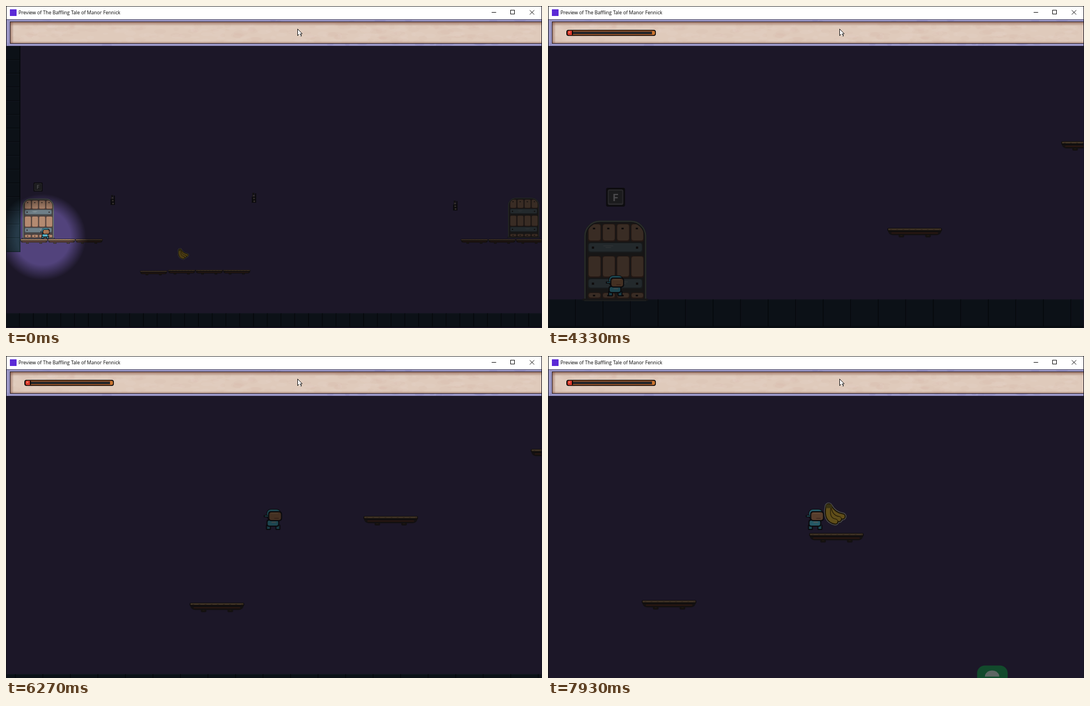
Recreate the animation shown at these times as an HTML page with a canvas. Size 964 by 581 pixels, loop 8 s.

```html
<!DOCTYPE html>
<html lang="en">
<head>
<meta charset="utf-8">
<title>Game preview</title>
<style>
  html, body { margin: 0; width: 100%; height: 100%; overflow: hidden; background: #1c1728; }
  canvas { display: block; width: 964px; height: 581px; }
</style>
</head>
<body>
<canvas id="stage" width="964" height="581"></canvas>
<script>
const W = 964, H = 581, LOOP = 8000, STEP = 200 / 3, DIM = 0.29;
const main = document.getElementById('stage').getContext('2d');
let g = main;

const layer = () => {
  const c = document.createElement('canvas');
  c.width = W;
  c.height = H;
  return c.getContext('2d');
};
const clamp = (v, lo, hi) => Math.max(lo, Math.min(hi, v));
const rgb = (r, gr, b, k = 1) => `rgb(${r * k | 0},${gr * k | 0},${b * k | 0})`;
const rect = (x, y, w, h, fill) => { g.fillStyle = fill; g.fillRect(x, y, w, h); };
const round = (x, y, w, h, r, fill) => {
  g.beginPath();
  g.roundRect(x, y, w, h, r);
  g.fillStyle = fill;
  g.fill();
};
const at = (x, y, s, draw) => {
  g.save();
  g.translate(x, y);
  g.scale(s, s);
  draw();
  g.restore();
};
const line = (color, width, ...pts) => {
  g.beginPath();
  pts.forEach(([x, y]) => g.lineTo(x, y));
  g.strokeStyle = color;
  g.lineWidth = width;
  g.stroke();
};

// ---- sprites, sized for the close-up room ----

// The door opens and shuts in four steps of 200 ms each way
const swing = (t, start) => {
  const n = Math.floor((t - start) / 200) + 1;
  return 1 - 0.24 * Math.max(0, 4 - Math.abs(n - 4));
};

function door(x, y, s, k, open) {
  at(x, y, s, () => {
    const arch = d => {
      g.beginPath();
      g.roundRect(d, d, 112 - 2 * d, 144 - d, [28 - d, 28 - d, 0, 0]);
    };
    arch(0);
    g.fillStyle = rgb(70, 68, 70, k);
    g.fill();
    arch(1.5);
    g.strokeStyle = rgb(142, 158, 146, k);
    g.lineWidth = 2.4;
    g.stroke();
    arch(4.5);
    g.fillStyle = open < 1 ? rgb(98, 95, 100, k) : rgb(82, 76, 76, k);
    g.fill();
    g.save();
    g.clip();
    // Planks and bands shrink towards the left hinge
    const px = u => 7 + 98 * open * u * (1 + (1 - open) * 0.5 * (1 - u));
    const slab = (u, v, top, h, fill, edge) => {
      const a = px(u), w = px(v) - a, r = Math.min(4, w / 3);
      round(a, top, w, h, r, edge);
      round(a + 1.2 * open, top + 1, Math.max(w - 2.4 * open, 0.5), h - 3, r, fill);
    };
    const wood = open < 1 ? rgb(200, 126, 104, k) : rgb(200, 154, 126, k);
    const woodEdge = rgb(125, 86, 72, k), hole = rgb(55, 42, 42, k), shine = rgb(160, 175, 180, k);
    [[6, 32], [64, 39], [130, 11]].forEach(([top, h], row) => {
      for (let i = 0; i < 4; i++) {
        const u = i * 0.262;
        slab(u, u + 0.24, top, h, wood, woodEdge);
        if (row !== 1) rect(px(u + 0.11) - 2 * open, top + (row ? 4 : 7), 4 * open, 3, hole);
      }
    });
    [40, 105].forEach((top, i) => {
      slab(0, 1, top, 18, rgb(124, 142, 152, k), rgb(84, 96, 102, k));
      [0.09, 0.9].forEach(u => rect(px(u) - 2 * open, top + 7, 4 * open, 4, hole));
      for (let j = 0; j < 2; j++) rect(px(0.28 + i * 0.27 + j * 0.04), top + 5 + j * 3, (18 - j * 8) * open, 1.5, shine);
    });
    g.restore();
    rect(-3, 141, 118, 3.5, rgb(80, 76, 80, k));
  });
}

function ledge(x, y, s, k) {
  at(x, y, s, () => {
    const dark = rgb(66, 58, 60, k);
    [25, 73].forEach(f => {
      round(f - 5, 9, 10, 7, 2, dark);
      rect(f - 2, 11.5, 4, 2, rgb(110, 84, 62, k));
    });
    round(1, 2, 96, 10, [2, 2, 9, 9], dark);
    round(7, 7, 84, 2.2, 1, rgb(145, 82, 62, k));
    round(0, -1, 98, 6, 2, rgb(52, 46, 46, k));
    rect(1.5, 0, 95, 3, rgb(222, 178, 128, k));
    for (let i = 5; i < 94; i += 11) rect(i, 1.5, 3, 1.5, rgb(165, 125, 92, k));
  });
}

function keyCap(x, y, s) {
  at(x, y, s, () => {
    round(0, 0, 34, 34, 3, '#0d0c0f');
    round(3, 3, 28, 28, 3, '#29282b');
    round(5, 5, 24, 23, 2, '#1b1b1d');
    g.fillStyle = '#4b4a4d';
    g.font = 'bold 18px Roboto, sans-serif';
    g.textAlign = 'center';
    g.fillText('F', 17, 24);
  });
}

function banana(x, y, s, k) {
  at(x, y, s, () => {
    const pass = (color, width, first = 0, last = 2) => {
      g.strokeStyle = color;
      g.lineWidth = width;
      g.beginPath();
      for (let i = first; i <= last; i++) {
        g.moveTo(11, 7);
        g.quadraticCurveTo(20 - 7 * i, 23 + 4 * i, 36 - 6.5 * i, 25 + 4.5 * i);
      }
      g.stroke();
    };
    g.lineCap = 'round';
    pass(rgb(190, 190, 180, k), 14);
    pass('#0c0b08', 11.5);
    for (let i = 0; i < 3; i++) {
      pass(rgb(80, 60, 18, k), 10, i, i);
      pass(rgb(214, 174, 58, k), 7.5, i, i);
    }
    round(6, 3, 11, 7, 2, rgb(125, 112, 46, k));
  });
}

function hero(x, y, s, k, stride = 0) {
  at(x, y, s, () => {
    const ink = '#0a0a0d', suit = rgb(80, 190, 218, k), low = rgb(66, 158, 182, k);
    [-13, 4].forEach((lx, i) => {
      const d = i ? -stride : stride;
      round(lx, 9, 9, 10 - Math.abs(d), 2, ink);
      rect(lx + 2 + d, 9, 5, 8 - Math.abs(d), low);
    });
    round(-12, 0, 23, 13, 4, ink);
    round(-10, 2, 19, 9, 3, suit);
    rect(-3, 4, 8, 2, rgb(160, 190, 195, k));
    round(-12, -19, 26, 20, 8, ink);
    round(-11, -18, 24, 17, 7, suit);
    round(-17, -8, 10, 4, 1, ink);
    rect(-15, -7, 7, 1.5, suit);
    round(-9, -15, 25, 18, 5, ink);
    round(-7, -13, 21, 14, 4, rgb(186, 130, 94, k));
    rect(-4, -12, 13, 2, rgb(205, 152, 112, k));
    rect(2, -3, 8, 1.5, rgb(140, 88, 66, k));
  });
}

function lamp(x, y) {
  rect(x - 4, y - 2, 8, 11, '#0c0b0e');
  rect(x - 3, y - 9, 4, 8, '#131115');
  rect(x + 2, y - 8, 2, 6, '#0c0b0e');
  for (let i = 0; i < 3; i++) rect(x - 2 + i / 2, y - 5 + i * 5, 3, 2.5, '#35302c');
}

function brick(x, y, s, lit) {
  const seam = lit ? '#1a2a35' : '#06090c';
  rect(x, y, s, s, lit ? '#263a48' : '#0c1117');
  rect(x, y, s, 1, lit ? '#2d4452' : '#11171e');
  rect(x + s - 1.5, y, 1.5, s, seam);
  rect(x, y + s - 1.2, s, 1.2, seam);
}

// ---- window, built once ----

const chrome = layer();
function buildChrome() {
  g = chrome;
  let seed = 7;
  const rnd = () => (seed = seed * 16807 % 2147483647) / 2147483647;
  const cloud = (n, y, h, tint) => {
    g.fillStyle = tint;
    for (let i = 0; i < n; i++) {
      g.beginPath();
      g.ellipse(rnd() * W, y + rnd() * h, 4 + rnd() * 9, 2 + rnd() * 3, 0, 0, 7);
      g.fill();
    }
  };
  rect(0, 0, W, 24, '#fff');
  rect(0, 0, W, 1, '#3c3c3c');
  rect(0, 0, 1, H, '#111115');
  rect(7, 6, 12, 12, '#5b2ad6');
  g.fillStyle = '#000';
  g.font = '8.7px "Open Sans", "Noto Sans", sans-serif';
  g.fillText('Preview of The Baffling Tale of Manor Fennick', 22.5, 15);
  rect(873.5, 11, 8, 1, '#111');
  g.strokeStyle = '#111';
  g.strokeRect(907.5, 7.5, 7, 7);
  line('#111', 1, [942, 7.5], [950, 15.5]);
  line('#111', 1, [950, 7.5], [942, 15.5]);
  // Parchment panel
  g.save();
  g.beginPath();
  g.rect(1, 24, 963, 48);
  g.clip();
  rect(1, 24, 963, 48, '#9a97c6');
  cloud(60, 24, 48, 'rgba(120,115,175,.2)');
  rect(1, 24, 963, 1, '#4a4768');
  rect(7, 28, 957, 40, '#2b1c20');
  g.beginPath();
  g.rect(8, 29, 956, 38);
  g.clip();
  rect(8, 29, 956, 38, '#dfcabb');
  cloud(120, 32, 34, 'rgba(214,184,166,.15)');
  cloud(120, 32, 34, 'rgba(236,218,206,.15)');
  const shade = (x0, y0, x1, y1, a) => {
    const grad = g.createLinearGradient(x0, y0, x1, y1);
    grad.addColorStop(0, `rgba(120,70,55,${a})`);
    grad.addColorStop(1, 'rgba(120,70,55,0)');
    rect(8, 29, 956, 38, grad);
  };
  shade(0, 29, 0, 36, 0.6);
  shade(0, 67, 0, 63, 0.35);
  shade(8, 0, 14, 0, 0.5);
  g.restore();
  rect(963, 0, 1, H, '#17131f');
}

function healthBar() {
  round(33, 43, 161, 11, 4, '#0b0908');
  round(35, 44.5, 157, 8, 3, '#b8622c');
  round(37, 46, 153, 5, 1, '#29282a');
  round(35, 44.5, 9, 8, 3, '#d8382c');
  rect(37, 46, 3, 3, '#f0705a');
  round(187, 45, 5.5, 7, 2, '#c9742f');
  rect(43, 45, 2, 7, '#0b0908');
}

function pointer() {
  line('#111', 2, [529, 50], [531, 54.5]);
  g.beginPath();
  [[524.5, 41.5], [524.5, 53.5], [527.5, 50.5], [532.8, 50]].forEach(([x, y]) => g.lineTo(x, y));
  g.closePath();
  g.fillStyle = '#fff';
  g.fill();
  g.lineWidth = 1;
  g.stroke();
  line('#fff', 1.4, [527.7, 49.5], [529.8, 54.2]);
}

// ---- first room ----

const glow = layer();

function radial(x, y, inner, outer, color) {
  const grad = g.createRadialGradient(x, y, inner, x, y, outer);
  grad.addColorStop(0, `rgba(${color},1)`);
  grad.addColorStop(1, `rgba(${color},0)`);
  return grad;
}

function hall(k, t, drift) {
  for (let i = 0; i < 15; i++) brick(1, 72.5 + i * 24.75, 24.7, k > 0.5);
  door(30, 347.5, 0.5, k, swing(t, 530));
  // Each run of ledges: left end, height, count
  [[26, 421, 3], [818, 421, 3], [241, 478, 1], [291.5, 476.5, 3]].forEach(([x, y, n]) => {
    for (let i = 0; i < n; i++) ledge(x + i * 49.5, y, 0.5, k);
  });
  if (t < 1130) hero(70.5 - drift * 0.6, 410.5, 0.5, k);
}

function firstRoom(t) {
  const drift = 2.2 * Math.min(2, Math.floor(t / STEP));
  const lx = 66 - drift, ly = 417;
  rect(1, 72, 962, 482, radial(lx, ly, 50, 78, '82,67,124'));
  for (let x = 0.5; x < W; x += 24.75) brick(x, 554.5, 24.7, false);
  hall(DIM, t, drift);
  door(903, 346, 0.5, DIM, 1);
  g = glow;
  g.globalCompositeOperation = 'source-over';
  g.clearRect(0, 0, W, H);
  hall(0.9, t, drift);
  g.globalCompositeOperation = 'destination-in';
  rect(0, 0, W, H, radial(lx, ly, 48, 82, '0,0,0'));
  g = main;
  g.drawImage(glow.canvas, 0, 0);
  keyCap(49.5, 318.5, 0.48);
  lamp(192, 350);
  lamp(446, 346);
  lamp(808, 360);
  banana(307.5, 437, 0.5, 0.36);
}

// ---- second room ----

const RUN_AT = 4584, BRAKE_AT = 7100, BRAKE_FOR = 830, SPEED = 0.38;
// Take-off time, height left, height reached
const JUMPS = [[5266, 505, 377], [6070, 377, 220], [6920, 220, 98.5]];

function heroX(t) {
  const u = clamp((t - BRAKE_AT) / BRAKE_FOR, 0, 1);
  return 121 + SPEED * (clamp(t, RUN_AT, BRAKE_AT) - RUN_AT) + SPEED * BRAKE_FOR * (u - u * u / 2);
}

function heroY(t) {
  return JUMPS.reduce((y, [t0, from, to]) => {
    if (t < t0) return y;
    const u = (t - t0) / 500 - 1, fly = from - 200 * (1 - u * u);
    return u > 0 ? Math.min(fly, to) : fly;
  }, 505);
}

function secondRoom(t) {
  const x = heroX(t), y = heroY(t);
  const cx = Math.max(0, x - 480.5), cy = Math.min(0, y - 295);
  const k = DIM + 0.1 * clamp((t - 7200) / 600, 0, 1);
  const grounded = JUMPS.every(([t0, , to]) => t < t0 || y === to);
  g.save();
  g.translate(-cx, -cy);
  for (let i = 0; i < 30; i++) {
    brick(0.8 + i * 49.5, 529.5, 49.4, false);
    rect(0.8 + i * 49.5, 579, 49.5, 120, '#0b0f15');
  }
  door(65, 387, 1, DIM, swing(t, 2330));
  ledge(610.5, 401.5, 1, DIM);
  ledge(923, 245, 1, DIM);
  ledge(1224, 124, 1, DIM);
  banana(1248, 68, 1, k + 0.06);
  if (t > 7330) {
    round(1526, 362, 55, 70, [14, 14, 0, 0], '#124a2c');
    g.beginPath();
    g.ellipse(1553, 382, 13, 11, 0, Math.PI, 0);
    g.fillStyle = '#5d6663';
    g.fill();
  }
  if (t > 3590) {
    if (x < 185) keyCap(104.5, 328, 1);
    const running = grounded && t > RUN_AT && t < BRAKE_AT;
    hero(x, y, 1, k + 0.08, running ? 2 * (-1) ** Math.floor(t / 133) : 0);
  }
  g.restore();
}

function frame(now) {
  const t = Math.floor((now % LOOP + 5) / STEP) * STEP + 0.5;
  g = main;
  rect(0, 0, W, H, '#1c1728');
  t < 2600 ? firstRoom(t) : secondRoom(t);
  g.drawImage(chrome.canvas, 0, 0);
  if (t >= 2600) healthBar();
  pointer();
}

buildChrome();
const start = performance.now();
function tick() {
  frame(performance.now() - start);
  requestAnimationFrame(tick);
}
tick();
</script>
</body>
</html>
```
